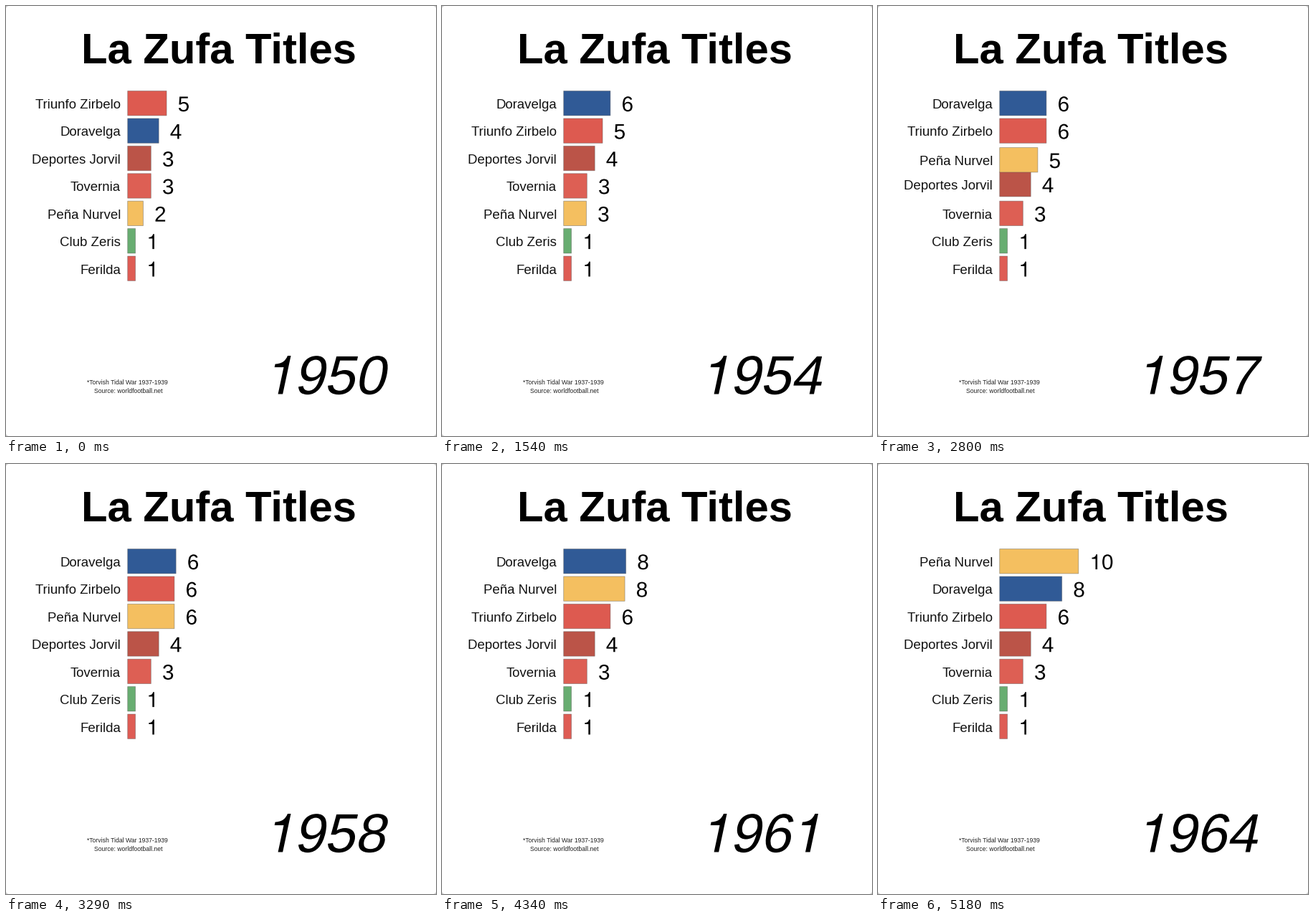
A matplotlib script that plays this animation: 600x600 px, repeating every 5250 ms.

```python
import matplotlib.pyplot as plt
import numpy as np
from matplotlib.animation import FuncAnimation
from matplotlib.patches import FancyBboxPatch, PathPatch, Rectangle
from matplotlib.path import Path
from matplotlib.textpath import TextPath

SIZE, DPI = 600, 100
FRAMES, INTERVAL = 75, 70
FONT = "Liberation Sans"

LEFT, UNIT = 169.7, 10.87         # bar start, pixels per title
TOP, PITCH, BAR_H = 135.7, 38.42, 34.4
SLANT = 0.2126
YEAR_FLIP = 0.78                  # part of a year after which the next is named

# name, colour, titles in 1950
CLUBS = [
    ("Triunfo Zirbelo", "#dd5a50", 5),
    ("Doravelga", "#305a96", 4),
    ("Deportes Jorvil", "#bb5448", 3),
    ("Tovernia", "#dd5f54", 3),
    ("Peña Nurvel", "#f4bf60", 2),
    ("Club Zeris", "#68ad71", 1),
    ("Ferilda", "#de5c54", 1),
]
WINNERS = [2, 1, 1, 4, 4, 0, 4, 4, 1, 1, 4, 4, 4, 4, 4]   # 1951 to 1965

# pace of the years, and the frames that repeat the one before
PACE_FRAMES = [0, 22, 40, 55, 62, 74]
PACE_YEARS = [0, 3.83, 6.8, 10, 11.76, 14.22]
PAUSES = {3, 6, 12, 18, 21, 33, 36, 42, 51, 57, 63, 66, 72}


def season_tables():
    """Titles and rows of every club, year by year."""
    totals = [np.array([c[2] for c in CLUBS], float)]
    rows = [np.arange(len(CLUBS), dtype=float)]
    for winner in WINNERS:
        total = totals[-1].copy()
        total[winner] += 1
        order = np.lexsort((rows[-1], -total))
        row = np.empty(len(CLUBS))
        row[order] = np.arange(len(CLUBS))
        totals.append(total)
        rows.append(row)
    return totals, rows


def smooth(x):
    return x * x * (3 - 2 * x)


def smoother(x):
    return x ** 3 * (10 - 15 * x + 6 * x * x)


def plain_one():
    """A numeral one without a foot, one em high."""
    pts = [
        (.273, 0), (.273, .490), (.105, .490), (.105, .548),
        (.225, .558), (.275, .595), (.300, .700),
        (.359, .700), (.359, 0), (.273, 0),
    ]
    codes = ([Path.MOVETO] + [Path.LINETO] * 3 + [Path.CURVE4] * 3
             + [Path.LINETO] * 2 + [Path.CLOSEPOLY])
    return Path(pts, codes)


DIGITS = {d: TextPath((0, 0), d, size=1, prop={"family": FONT}) for d in "023456789"}
DIGITS["1"] = plain_one()


def number_path(number, x, y, size, slant=0):
    parts = []
    for i, d in enumerate(str(number)):
        gx, gy = DIGITS[d].vertices.T
        verts = np.column_stack([x + size * (gx + slant * gy + .556 * i),
                                 y - size * gy])
        parts.append(Path(verts, DIGITS[d].codes))
    return Path.make_compound_path(*parts)


def label(x, y, text, px, **kw):
    return ax.text(x, y, text, fontsize=px * 72 / DPI, family=FONT,
                   va="baseline", **kw)


def number_patch():
    return ax.add_patch(PathPatch(Path([(0, 0)]), facecolor="black", lw=0, zorder=20))


fig = plt.figure(figsize=(SIZE / DPI, SIZE / DPI), dpi=DPI, facecolor="#c4c4c4")
ax = fig.add_axes([0, 0, 1, 1])
ax.set_xlim(0, SIZE)
ax.set_ylim(SIZE, 0)
ax.axis("off")
ax.add_patch(FancyBboxPatch((0, 0), SIZE, SIZE, facecolor="white", lw=0, zorder=0,
                            boxstyle="round,pad=0,rounding_size=4"))

label(297, 79.6, "La Zufa Titles", 59.8, weight="bold", ha="center")
label(169, 528, "*Torvish Tidal War 1937-1939", 8.6, ha="center", color="#222222")
label(171, 540, "Source: worldfootball.net", 8.6, ha="center", color="#222222")

bars, names, counts = [], [], []
for name, color, _ in CLUBS:
    bars.append(ax.add_patch(Rectangle((LEFT, 0), 1, BAR_H, facecolor=color, snap=False,
                                       edgecolor=(.35, .35, .35, .5), lw=.6)))
    names.append(label(160, 0, name, 18.6, ha="right", color="#111111", zorder=20))
    counts.append(number_patch())
year = number_patch()

TOTALS, ROWS = season_tables()


def draw(frame):
    if frame in PAUSES:
        frame -= 1
    t = np.interp(frame, PACE_FRAMES, PACE_YEARS)
    k = int(t)
    part = t - k
    values = TOTALS[k] + (TOTALS[k + 1] - TOTALS[k]) * smooth(part)
    places = ROWS[k] + (ROWS[k + 1] - ROWS[k]) * smoother(part)

    for bar, name, count, value, place in zip(bars, names, counts, values, places):
        mid = TOP + PITCH * place
        end = LEFT + UNIT * value
        bar.set_y(mid - BAR_H / 2)
        bar.set_width(end - LEFT)
        bar.set_zorder(2 + value / 10)
        name.set_y(mid + 7.3)
        count.set_path(number_path(int(value + .5), end + 15.6, mid + 11.3, 29.8))

    shown = 1950 + k + int(part >= YEAR_FLIP)
    year.set_path(number_path(shown, 358.7, 541.5, 76.4, SLANT))
    return [*bars, *names, *counts, year]


anim = FuncAnimation(fig, draw, frames=FRAMES, interval=INTERVAL,
                     init_func=lambda: draw(0), repeat=True, repeat_delay=0)
plt.show()
```
